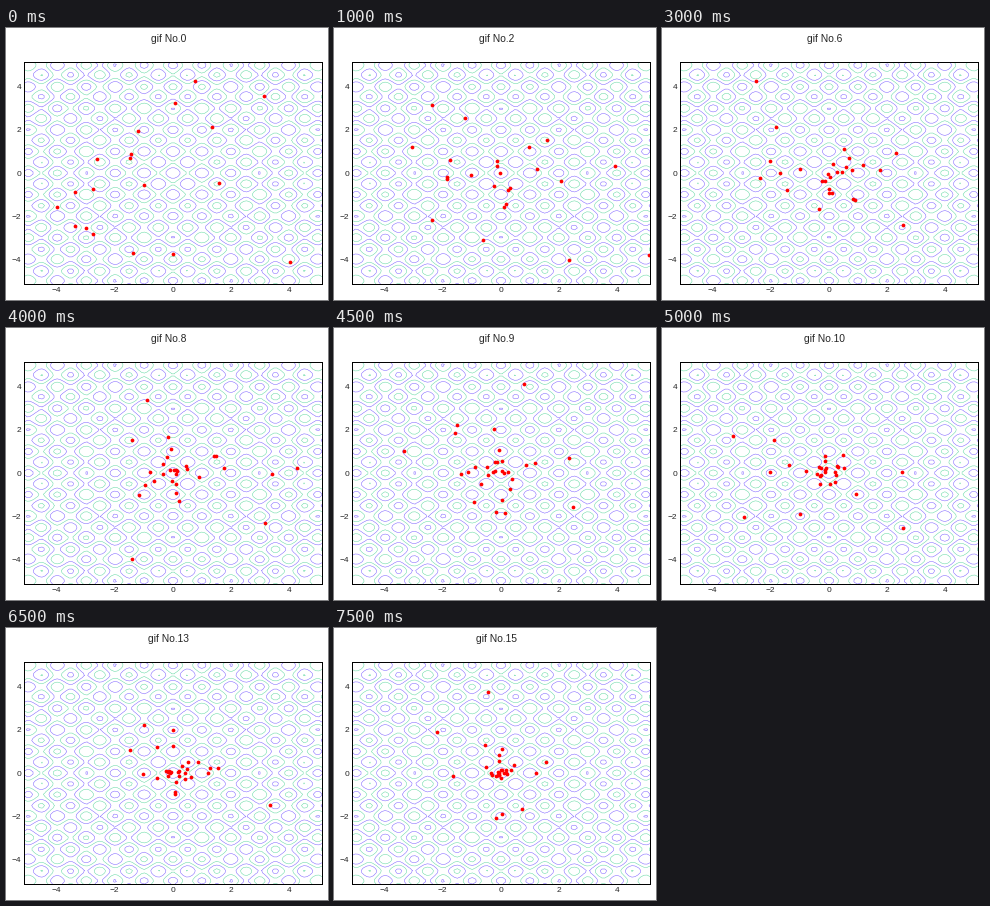
A matplotlib script that plays this animation: 322x272 px, repeating every 8000 ms.

```python
import numpy as np
import matplotlib.pyplot as plt
from matplotlib.animation import FuncAnimation

W, H, DPI = 322, 272, 100
STEPS, STEP_MS = 16, 500
LIM, SWARM = 5.12, 30
INERTIA, PULL = 0.7, 1.45
INK = "#262626"
LINES = ["#7a5cff", "#5fd8a0"]

plt.rcParams.update({
    "font.family": "Liberation Sans",
    "axes.linewidth": 0.72,
    "xtick.labelsize": 6,
    "ytick.labelsize": 6,
})


def rastrigin(x, y):
    return 20 + x**2 + y**2 - 10 * (np.cos(2 * np.pi * x) + np.cos(2 * np.pi * y))


def fly():
    """Particle swarm drawn to the origin, one array of positions per step."""
    rng = np.random.default_rng(4)
    pos = rng.normal(0, 4.2, (SWARM, 2))
    vel = rng.uniform(-1, 1, pos.shape)
    best, path = pos.copy(), [pos]
    for _ in range(STEPS - 1):
        lead = best[np.argmin(np.hypot(*best.T))]
        r1, r2 = rng.random((2, *pos.shape))
        vel = INERTIA * vel + PULL * (r1 * (best - pos) + r2 * (lead - pos))
        pos = pos + vel
        better = np.hypot(*pos.T) < np.hypot(*best.T)
        best[better] = pos[better]
        path.append(pos)
    return path


path = fly()
fig = plt.figure(figsize=(W / DPI, H / DPI), dpi=DPI, facecolor="white")
ax = fig.add_axes([18 / W, 1 - 256 / H, 298 / W, 222 / H])
ax.set(xlim=(-LIM, LIM), ylim=(-LIM, LIM),
       xticks=range(-4, 5, 2), yticks=range(-4, 5, 2))
ax.tick_params(length=0, pad=2, colors=INK)

side = np.linspace(-LIM, LIM, 100)
gx, gy = np.meshgrid(side, side)
ax.contour(gx, gy, rastrigin(gx, gy), levels=np.arange(10, 81, 10),
           colors=LINES, linewidths=0.35)
dots, = ax.plot([], [], "o", color="red", ms=2.7, mew=0, zorder=2.4)
title = fig.text(162.5 / W, 1 - 11 / H, "", size=7.4, ha="center", va="center",
                 color=INK)


def draw(k):
    dots.set_data(*path[k].T)
    title.set_text(f"gif No.{k}")
    return dots, title


anim = FuncAnimation(fig, draw, frames=STEPS, interval=STEP_MS,
                     repeat=True, repeat_delay=0)
plt.show()
```
